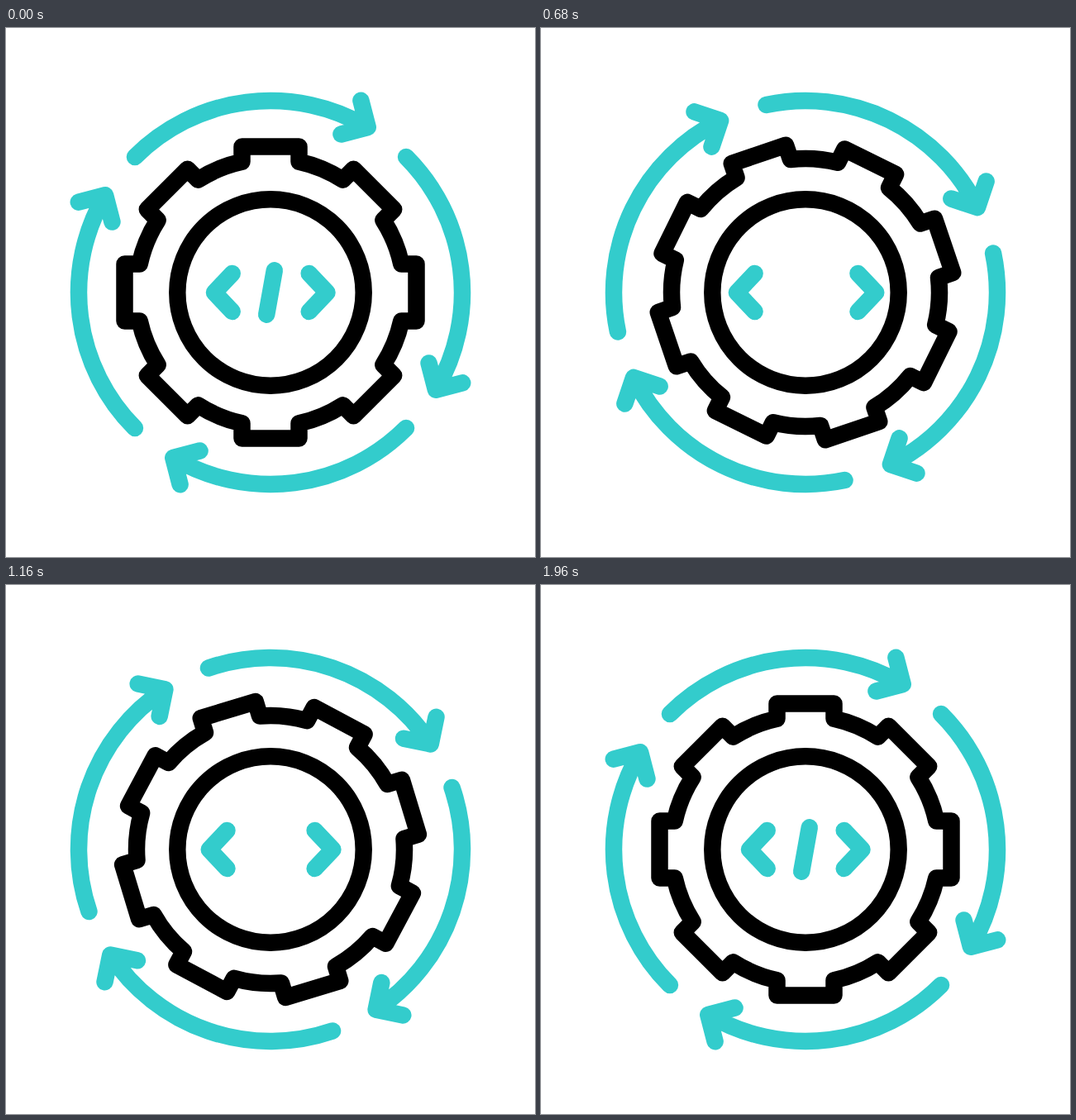
An HTML page for the animation above (2000 ms loop, 640 by 640 pixels).

```html
<!DOCTYPE html>
<html lang="en">
<head>
<meta charset="utf-8">
<title>Code gear</title>
<style>
  html, body { margin: 0; width: 100%; height: 100%; overflow: hidden; background: #fff; }
  svg { display: block; width: 100%; height: 100%; }
  path, circle { fill: none; stroke-width: 20.5; stroke-linecap: round; stroke-linejoin: round; }
  .dark { stroke: #000; }
  .teal { stroke: #3cc; }
</style>
</head>
<body>
<svg viewBox="-320 -320 640 640">
  <g class="teal" id="arrows"></g>
  <g class="dark">
    <path id="gear"/>
    <circle r="112.7"/>
  </g>
  <g class="teal">
    <path id="left" d="M-46.3-23L-68-0L-46.3 23"/>
    <path id="slash" d="M4.8-26.7L-4.8 26.7"/>
    <path id="right" d="M46.7-23L68.5 0L46.7 23"/>
  </g>
</svg>
<script>
const LOOP = 2000;
const $ = id => document.getElementById(id);

// Point at a clockwise angle from the top, shifted sideways and outwards.
function polar(deg, out, side = 0) {
  const a = deg * Math.PI / 180, c = Math.cos(a), s = Math.sin(a);
  return `${(side * c + out * s).toFixed(2)} ${(side * s - out * c).toFixed(2)}`;
}

function gearPath() {
  const root = 162, tip = 176.5, half = 34.5, foot = Math.sqrt(root * root - half * half);
  let d = '';
  for (let a = 0; a < 360; a += 45) {
    d += (a ? `A${root} ${root} 0 0 1 ` : 'M') + polar(a, foot, -half) +
      `L${polar(a, tip, -half)}L${polar(a, tip, half)}L${polar(a, foot, half)}`;
  }
  return d + `A${root} ${root} 0 0 1 ${polar(0, foot, -half)}Z`;
}

function arrowPath(turn) {
  const r = 232, wing = 23.6, end = turn + 30.5;
  return `M${polar(turn - 45, r)}A${r} ${r} 0 0 1 ${polar(end, r)}` +
    `M${polar(end, r + wing, -wing)}L${polar(end, r)}L${polar(end, r - wing, -wing)}`;
}

// Ease of cubic-bezier(.5, 0, .5, 1) between two times.
function ease(t, from, to) {
  const x = Math.min(1, Math.max(0, (t - from) / (to - from)));
  let lo = 0, hi = 1;
  for (let i = 0; i < 30; i++) {
    const s = (lo + hi) / 2;
    if (1.5 * s - 1.5 * s * s + s * s * s < x) lo = s; else hi = s;
  }
  return lo * lo * (3 - 2 * lo);
}

function draw(t) {
  const spread = ease(t, 70, 770) - ease(t, 770, 1480);
  $('arrows').setAttribute('transform', `rotate(${180 * ease(t, 80, 1960)})`);
  $('gear').setAttribute('transform', `rotate(${180 * ease(t, 0, 1520)})`);
  $('left').setAttribute('transform', `translate(${-15.5 * spread})`);
  $('right').setAttribute('transform', `translate(${17.2 * spread})`);
  $('slash').setAttribute('visibility', t >= 680 && t < 1320 ? 'hidden' : 'visible');
}

$('gear').setAttribute('d', gearPath());
$('arrows').innerHTML = [0, 90, 180, 270].map(a => `<path d="${arrowPath(a)}"/>`).join('');

let start;
function tick(now) {
  start ??= now;
  draw((now - start) % LOOP);
  requestAnimationFrame(tick);
}
draw(0);
requestAnimationFrame(tick);
</script>
</body>
</html>
```
